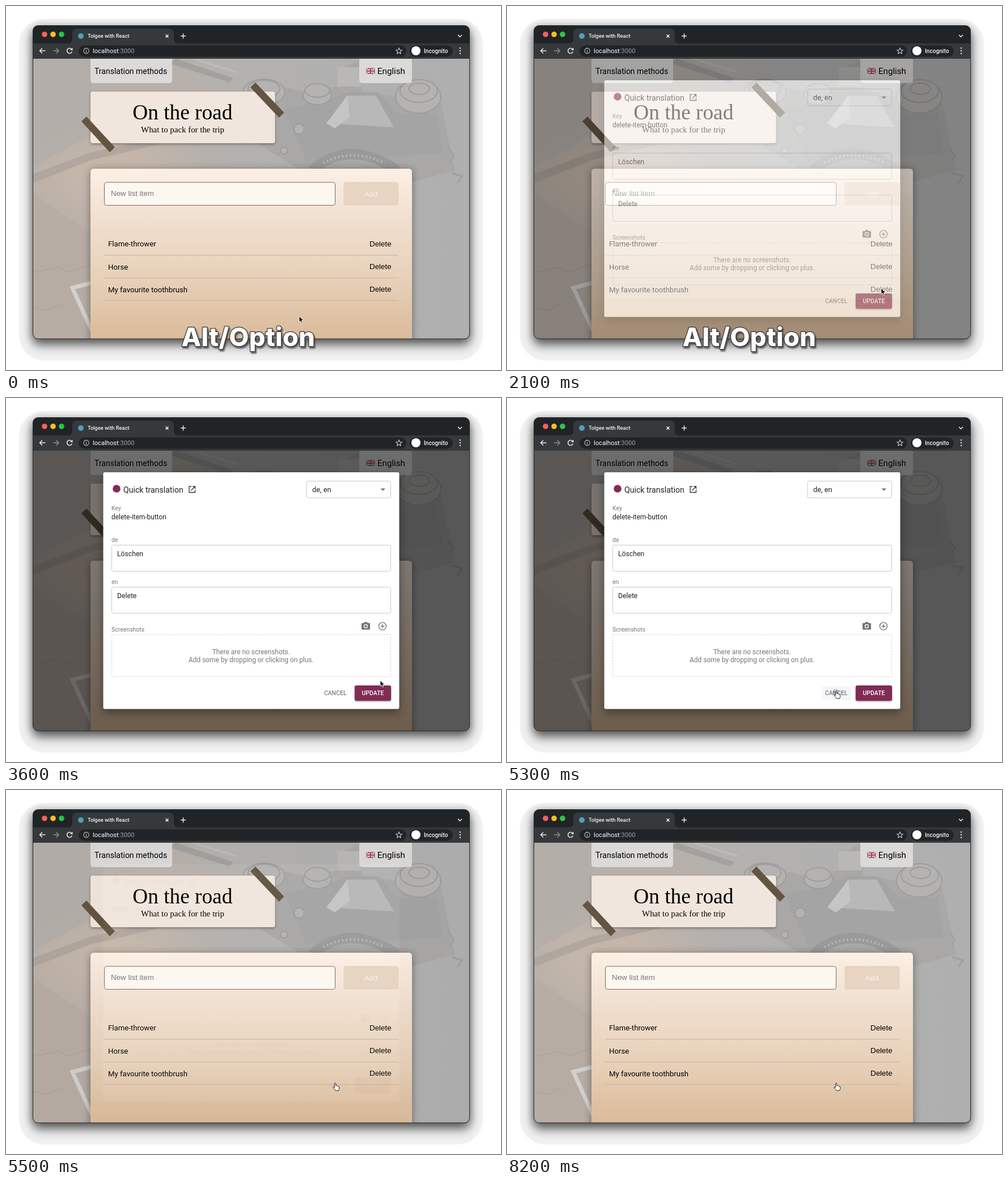
An HTML page that plays this animation: 873x642 px, repeating every 8300 ms.

```html
<!DOCTYPE html>
<html lang="en">
<head>
<meta charset="utf-8">
<title>On the road</title>
<style>
  html, body { margin: 0; width: 100%; height: 100%; overflow: hidden; background: #fff; }
  svg { display: block; }
  text { font-family: Roboto, sans-serif; }
  .serif { font-family: "Liberation Serif", serif; text-anchor: middle; }
  .arial { font-family: "Liberation Sans", sans-serif; font-size: 13.4px; }
  .list { font-size: 13.2px; }
  .label { font-size: 10.5px; fill: #777; }
  .value { font-size: 12.2px; fill: #222; }
  .hint { font-size: 11.9px; fill: #777; text-anchor: middle; }
  .button { font-size: 10.4px; font-weight: 500; letter-spacing: .1px; }
  .field { fill: #fff; stroke: #c8c8c8; }
  .line { fill: none; stroke: #e8eaed; stroke-width: 1.5; }
  #caption { font: 800 45.5px Inter, sans-serif; text-anchor: middle; fill: #fff;
    stroke: #333; stroke-width: 2.4; paint-order: stroke; stroke-linejoin: round;
    filter: drop-shadow(2px 3px 1px #444c); }
</style>
</head>
<body>
<svg width="873" height="642" viewBox="0 0 873 642">
  <defs>
    <linearGradient id="desk">
      <stop offset="0" stop-color="#b9b0a9"/><stop offset=".3" stop-color="#b8b0aa"/>
      <stop offset=".55" stop-color="#b2b1b0"/><stop offset="1" stop-color="#afafaf"/>
    </linearGradient>
    <linearGradient id="paper" x2="0" y2="1">
      <stop offset="0" stop-color="#fcefe4"/><stop offset=".3" stop-color="#f0dfcf"/>
      <stop offset=".65" stop-color="#e6cfb6"/><stop offset="1" stop-color="#d9b896"/>
    </linearGradient>
    <radialGradient id="glow">
      <stop offset="0" stop-color="#cbb9aa"/><stop offset="1" stop-color="#cbb9aa" stop-opacity="0"/>
    </radialGradient>
    <clipPath id="window"><rect x="47.5" y="34.5" width="770" height="552.5" rx="9"/></clipPath>
    <clipPath id="page"><rect x="48" y="93" width="769" height="494"/></clipPath>
    <clipPath id="cancelBox"><rect x="555" y="508" width="52" height="26" rx="3"/></clipPath>
  </defs>

  <!-- window shadow -->
  <rect x="23" y="23" width="818" height="602" rx="44" fill="#f2f2f2"/>
  <rect x="47.5" y="34.5" width="770" height="552.5" rx="9" fill="#202427"
    style="filter:drop-shadow(0 3px 8px #0005) drop-shadow(0 10px 9px #0008)"/>

  <g clip-path="url(#window)">
    <!-- browser bar -->
    <path d="M48 66H109Q117 66 117 58V48Q117 40 125 40H288Q296 40 296 48V58Q296 66 304 66H818V93H48Z" fill="#35393c"/>
    <circle cx="68" cy="50" r="4.8" fill="#fd5f57"/>
    <circle cx="83" cy="50" r="4.8" fill="#febc2e"/>
    <circle cx="98" cy="50" r="4.8" fill="#28c840"/>
    <circle cx="132" cy="53" r="5" fill="#4f9fb8"/>
    <text x="144" y="56" font-size="9.3" font-weight="500" fill="#f1f3f4">Tolgee with React</text>
    <path class="line" d="M281.500 50.500l5 5m0-5l-5 5M308 53h9m-4.500-4.500v9M797 51l3.500 3.500 3.500-3.500"/>
    <path class="line" d="M69.500 79H59.500m4.500-4.500L59.500 79l4.500 4.500M115.800 76.500a4.500 4.500 0 1 0 .5 4"/>
    <path d="M117.500 73.500v4.500h-4.500z" fill="#e8eaed"/>
    <path class="line" d="M83 79h10m-4.500-4.500L93 79l-4.500 4.500" style="stroke:#8a8d90"/>
    <rect x="128" y="69.500" width="578" height="20" rx="10" fill="#202427"/>
    <g fill="none" stroke="#c6c9cc" stroke-width="1.1">
      <circle cx="141.500" cy="79" r="4.600"/>
      <path d="M141.500 78.200v3.300M141.500 76v1.200"/>
      <path d="M693 74l1.500 3.500 3.800.3-2.900 2.500.9 3.700-3.300-2-3.300 2 .9-3.700-2.900-2.500 3.800-.3z"/>
    </g>
    <text x="153" y="83" font-size="11.2" fill="#fff">localhost<tspan fill="#9aa0a6">:3000</tspan></text>
    <rect x="712" y="69.500" width="76" height="20" rx="10" fill="#202427"/>
    <circle cx="723" cy="79" r="8" fill="#fff"/>
    <text x="737" y="83" font-size="10.1" font-weight="500" fill="#f1f3f4">Incognito</text>
    <path d="M801 74.200h.01M801 79h.01M801 83.800h.01" stroke="#e8eaed" stroke-width="2.400" stroke-linecap="round"/>

    <g clip-path="url(#page)">
      <!-- desk photo as flat shapes -->
      <rect x="48" y="93" width="769" height="494" fill="url(#desk)"/>
      <ellipse cx="190" cy="300" rx="170" ry="95" fill="url(#glow)"/>
      <path d="M48 93H150V228L48 284Z" fill="#b1adaa" opacity=".6"/>
      <path d="M48 296L150 258 270 232V244L150 272 48 312Z" fill="#aaa098" opacity=".65"/>
      <path d="M48 330L149 400V587H48Z" fill="#b7aaa0" opacity=".55"/>
      <path d="M50 470l40-9 20 8 39-13M48 532l24 5 26-12" fill="none" stroke="#a99d94"/>
      <path d="M300 93L400 127 394 135 288 101Z" fill="#a2a1a0"/>
      <path d="M330 93L408 117" stroke="#bdbcbb" stroke-width="3"/>
      <path d="M420 160Q455 132 520 150L585 142 588 112 627 93V150L690 160Q740 130 765 160L792 290 716 310 520 290 440 240Z" fill="#a9a8a7"/>
      <path d="M490 182L560 170 600 152H655L692 190 760 190 770 260 530 274Z" fill="#a4a4a4"/>
      <path d="M565 207L602 158H652L684 214Z" fill="#b8b8b8"/>
      <path d="M565 207L602 158 606 196 580 216Z" fill="#c5c5c5"/>
      <path d="M585 142V108H626V142Z" fill="#b9b8b7"/>
      <g fill="#b4b3b2" stroke="#9d9c9b" stroke-width="2">
        <ellipse cx="455" cy="152" rx="37" ry="23"/><ellipse cx="455" cy="146" rx="28" ry="15"/>
        <ellipse cx="549" cy="158" rx="25" ry="16"/><ellipse cx="549" cy="149" rx="22" ry="12"/>
        <ellipse cx="727" cy="160" rx="40" ry="29"/><ellipse cx="728" cy="150" rx="33" ry="20"/>
        <ellipse cx="729" cy="146" rx="18" ry="10"/>
        <circle cx="517" cy="217" r="9"/><circle cx="490" cy="255" r="6"/>
      </g>
      <path d="M540 290Q605 232 690 290" fill="none" stroke="#9a9a9a" stroke-width="18"/>
      <path d="M560 277Q610 250 668 277" fill="none" stroke="#bfbfbf" stroke-width="4" stroke-dasharray="2 5"/>
      <path d="M780 250l10 14-6 10M786 295l18 5-8 12" fill="none" stroke="#a0a0a0" stroke-width="3"/>
      <path d="M158 587L117 497 160 486" fill="none" stroke="#d2d0ce" stroke-width="7"/>

      <!-- app page -->
      <path d="M149 93H293V130Q293 136 287 136H155Q149 136 149 130ZM623 93H716V130Q716 136 710 136H629Q623 136 623 130Z" fill="#dbdad9"/>
      <text x="156" y="120" font-size="14">Translation methods</text>
      <text x="655" y="120" font-size="15.1">English</text>
      <g transform="translate(635.500 109.500)">
        <rect width="15" height="10.500" rx="1" fill="#34456f"/>
        <path d="M0 0L15 10.500M15 0L0 10.500" stroke="#eee" stroke-width="2.200"/>
        <path d="M0 0L15 10.500M15 0L0 10.500" stroke="#c54450" stroke-width=".8"/>
        <path d="M7.500 0V10.500M0 5.250H15" stroke="#eee" stroke-width="3.400"/>
        <path d="M7.500 0V10.500M0 5.250H15" stroke="#c83242" stroke-width="2"/>
      </g>
      <rect x="149" y="151" width="325.500" height="91" rx="4" fill="#f0e6dd" style="filter:drop-shadow(0 2px 2px #0005)"/>
      <path d="M133 203.500L142 195 192 249 183 258ZM431 143.500L440 135 490.500 188 481.500 197Z" fill="#635542"/>
      <text class="serif" x="311.300" y="200" font-size="37.300">On the road</text>
      <text class="serif" x="311.500" y="223" font-size="14.900">What to pack for the trip</text>

      <path d="M149 600V293Q149 287 155 287H710Q716 287 716 293V600Z" fill="url(#paper)" style="filter:drop-shadow(0 2px 7px #0006)"/>
      <rect x="173.500" y="311" width="407" height="40.500" rx="4" fill="#fdf7f2" stroke="#806850"/>
      <text class="arial" x="185" y="335" fill="#757575">New list item</text>
      <rect x="595.500" y="310.500" width="97" height="41.500" rx="4" fill="#e7d4c3"/>
      <text class="arial" x="643.500" y="335.500" fill="#fbf4ee" text-anchor="middle">Add</text>
      <path d="M173 439.500H692M173 479.500H692M173 519.500H692" stroke="#c4b3a4"/>
      <rect id="mark" x="641" y="492" width="39.500" height="15" fill="#f6f6f8"/>
      <text class="list" x="180" y="424">Flame-thrower</text>
      <text class="list" x="180" y="464.500">Horse</text>
      <text class="list" x="180" y="504.500">My favourite toothbrush</text>
      <g class="arial">
        <text class="arial" x="641" y="423.500">Delete</text>
        <text class="arial" x="641" y="463.500">Delete</text>
        <text class="arial" x="641" y="504">Delete</text>
      </g>

      <!-- dialog -->
      <g id="dialog">
        <rect x="48" y="93" width="769" height="494" opacity=".5"/>
        <rect x="171.500" y="131" width="522" height="417.500" rx="3" fill="#fff" style="filter:drop-shadow(0 6px 8px #0006)"/>
        <circle cx="195" cy="160" r="6.800" fill="#822b55"/>
        <text x="207" y="166.500" font-size="14.100" fill="#222">Quick translation</text>
        <path d="M327 156H323V166.500H333.500V162M329 156H333.500V160.500M333.500 156L326.500 163" fill="none" stroke="#333" stroke-width="1.300"/>
        <rect class="field" x="530" y="146.500" width="148.500" height="29.500" rx="3"/>
        <text x="540" y="166" font-size="12.800" fill="#222">de, en</text>
        <path d="M660.500 159.500h8.500l-4.250 4.200z" fill="#757575"/>
        <text class="label" x="186" y="198">Key</text>
        <text class="value" x="186" y="214" style="font-size:11.900px">delete-item-button</text>
        <text class="label" x="186" y="254">de</text>
        <rect class="field" x="186.500" y="259.500" width="492" height="46" rx="3"/>
        <text class="value" x="196" y="278.500">Löschen</text>
        <text class="label" x="186" y="328">en</text>
        <rect class="field" x="186.500" y="333.500" width="492" height="46" rx="3"/>
        <text class="value" x="196" y="352.500">Delete</text>
        <text class="label" x="186" y="412">Screenshots</text>
        <path d="M628 397h3l1.500-2h4l1.500 2h3q1 0 1 1v9.500q0 1-1 1H628q-1 0-1-1V398q0-1 1-1z" fill="#757575"/>
        <circle cx="634.500" cy="402.500" r="3" fill="#757575" stroke="#fff" stroke-width="1.300"/>
        <g fill="none" stroke="#757575" stroke-width="1.400">
          <circle cx="664" cy="402.500" r="6.600"/><path d="M660.500 402.500h7M664 399v7"/>
        </g>
        <rect class="field" x="186.500" y="417.500" width="492" height="74" stroke-dasharray="3 2" style="stroke:#d4d4d4"/>
        <text class="hint" x="432.300" y="452">There are no screenshots.</text>
        <text class="hint" x="432.300" y="466">Add some by dropping or clicking on plus.</text>
        <g id="cancel" clip-path="url(#cancelBox)">
          <rect x="555" y="509" width="52" height="24" rx="3" fill="#f4f6f9"/>
          <circle id="ripple" cx="580" cy="519" opacity=".25" fill="#3c4650"/>
        </g>
        <text class="button" x="580.800" y="524" text-anchor="middle" fill="#5a6068" style="font-weight:400">CANCEL</text>
        <rect id="update" x="615" y="507" width="64" height="27" rx="3" style="filter:drop-shadow(0 1px 1.500px #0007)"/>
        <text class="button" x="647" y="524" text-anchor="middle" fill="#fff">UPDATE</text>
      </g>
    </g>
  </g>
  <rect x="47.500" y="34.500" width="770" height="552.500" rx="9" fill="none" stroke="#25282a"/>

  <g id="cursor" stroke-linejoin="round">
    <path id="arrow" d="M0 0V10.500L2.400 8.300 4 12 5.900 11.200 4.300 7.700H7.500Z" fill="#000" stroke="#fff" stroke-width=".9"/>
    <path id="hand" d="M-1.500 8V1Q-1.500 0 -.500 0 .700 0 .700 1V4.500Q2.300 3.800 2.800 5 4.300 4.400 4.800 5.700 6.600 5.300 6.600 7V9.500Q6.600 11 5.500 13H0Q-1.500 10.700 -3.800 8.200 -4.300 6.600 -2.800 6.700Z" fill="#fff" stroke="#111" stroke-width=".9"/>
  </g>
  <text id="caption" x="427" y="600">Alt/Option</text>
</svg>
<script>
const LOOP = 8300, STEP = 100;
const path = [[0, 517, 547], [300, 517, 547], [1200, 660, 498], [3900, 660, 498],
  [4500, 662, 515], [4900, 662, 515], [5200, 581, 517], [LOOP, 581, 517]];
const el = id => document.getElementById(id);
const clamp = v => Math.min(1, Math.max(0, v));
const ease = v => v * v * (3 - 2 * v);
const show = (id, on) => el(id).setAttribute("opacity", +on);

function pointer(t) {
  const i = path.findIndex(p => p[0] > t);
  const [t0, x0, y0] = path[i - 1], [t1, x1, y1] = path[i];
  const k = ease((t - t0) / (t1 - t0));
  return [x0 + (x1 - x0) * k, y0 + (y1 - y0) * k];
}

function draw(t) {
  const [x, y] = pointer(t);
  const overDelete = t >= 1100 && t < 2100;
  const overUpdate = t >= 4200 && x > 615;
  const overCancel = t > 5000 && x < 607;
  const hand = overDelete || overUpdate || overCancel;
  show("mark", overDelete);
  show("hand", hand);
  show("arrow", !hand);
  el("cursor").setAttribute("transform", `translate(${x} ${y})`);
  show("dialog", t < 5300 ? clamp((t - 2000) / 200) : clamp(1 - (t - 5300) / 240) ** 2);
  show("cancel", overCancel);
  el("ripple").setAttribute("r", t < 5300 ? 0 : 6 + (t - 5300) * .16);
  el("update").setAttribute("fill", overUpdate ? "#5f1f3f" : "#822b55");
  show("caption", 1 - clamp((t - 2400) / 400));
}

const start = performance.now();
function tick() {
  const t = (performance.now() - start) % LOOP;
  draw(Math.floor(t / STEP) * STEP);
  requestAnimationFrame(tick);
}
tick();
</script>
</body>
</html>
```
